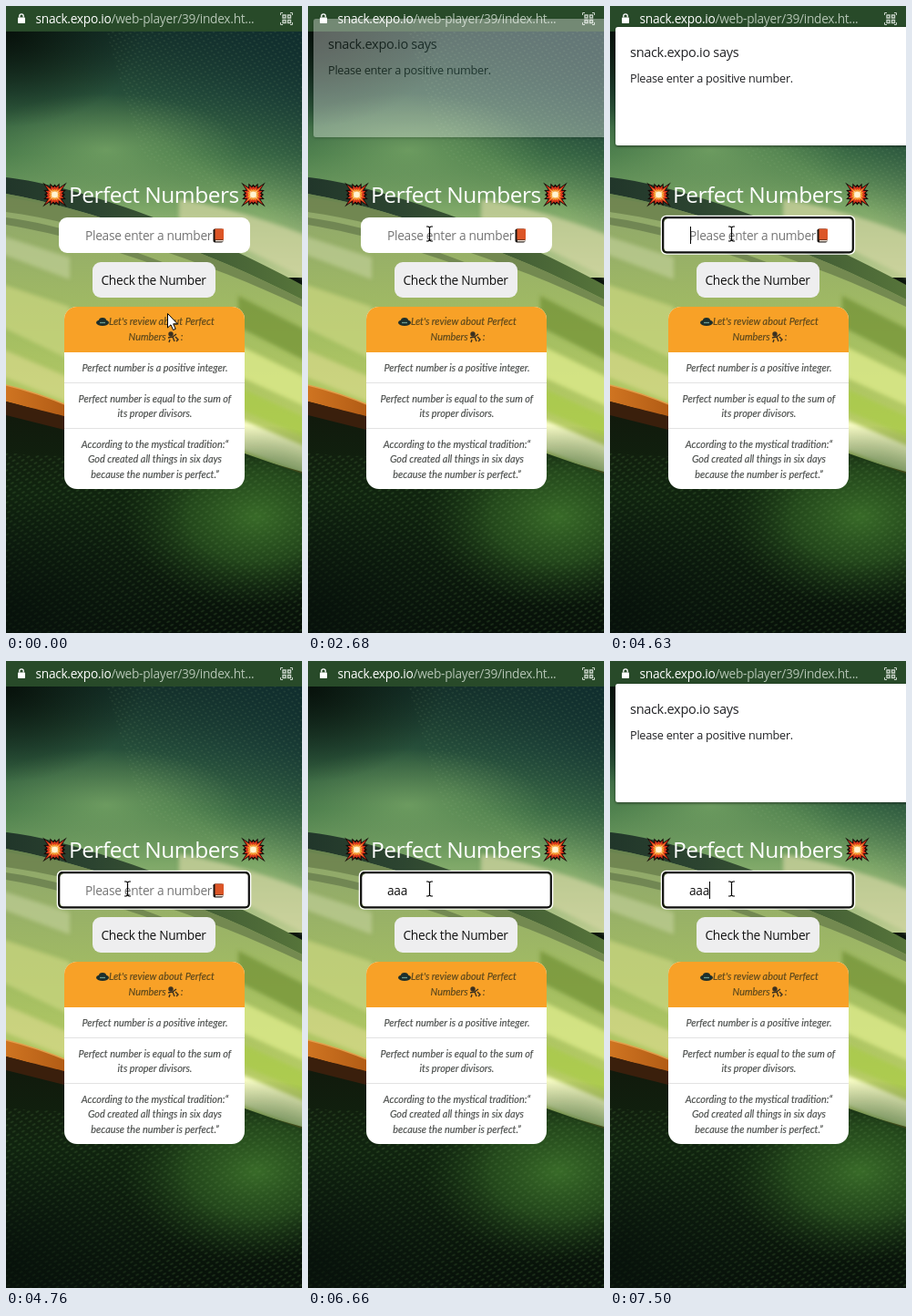
These frames come from a looping animation (325x688 px, 8000 ms). An HTML page:

```html
<!DOCTYPE html>
<html lang="en">
<head>
<meta charset="utf-8">
<title>Perfect Numbers</title>
<style>
  html, body { margin: 0; width: 100%; height: 100%; overflow: hidden; background: #0b150d; }
  svg { display: block; width: 325px; height: 688px; }
  text { font-family: "Open Sans", "Noto Sans", sans-serif; font-size: 13.7px; letter-spacing: -.02em; white-space: pre; }
  .note text { font-family: Lato, sans-serif; font-size: 10.9px; font-style: italic; letter-spacing: 0; text-anchor: middle; fill: #4a4d4b; stroke: #4a4d4b; stroke-width: .15px; }
  .note .head { fill: #59461c; stroke: #59461c; }
</style>
</head>
<body>
<svg viewBox="0 0 325 688">
  <defs>
    <linearGradient id="sky" x1="0" y1="0" x2="0" y2="1">
      <stop offset="0" stop-color="#162f23"/>
      <stop offset=".25" stop-color="#28513a"/>
      <stop offset=".5" stop-color="#467a49"/>
      <stop offset=".72" stop-color="#7da767"/>
      <stop offset="1" stop-color="#bccb90"/>
    </linearGradient>
    <linearGradient id="teal" x1="0" y1="1" x2="1" y2="0">
      <stop offset=".5" stop-color="#14363a" stop-opacity="0"/>
      <stop offset="1" stop-color="#102e2e"/>
    </linearGradient>
    <radialGradient id="glow">
      <stop offset="0" stop-color="#8db873" stop-opacity=".55"/>
      <stop offset="1" stop-color="#7fa36a" stop-opacity="0"/>
    </radialGradient>
    <radialGradient id="shade">
      <stop offset="0" stop-color="#07110b"/>
      <stop offset="1" stop-color="#0c1a11" stop-opacity="0"/>
    </radialGradient>
    <linearGradient id="field" x1="0" y1="0" x2="0" y2="1">
      <stop offset="0" stop-color="#8ea66b"/>
      <stop offset=".5" stop-color="#a5bf62"/>
      <stop offset="1" stop-color="#c3d568"/>
    </linearGradient>
    <linearGradient id="band" x1="0" y1="0" x2="1" y2="0">
      <stop offset="0" stop-color="#21362a"/>
      <stop offset=".3" stop-color="#2c4430"/>
      <stop offset="1" stop-color="#56743a"/>
    </linearGradient>
    <linearGradient id="rust" x1="0" y1="0" x2="1" y2="0">
      <stop offset="0" stop-color="#cf7421"/>
      <stop offset=".3" stop-color="#a4500f"/>
      <stop offset="1" stop-color="#5a3a12"/>
    </linearGradient>
    <linearGradient id="floor" x1="0" y1="0" x2="0" y2="1">
      <stop offset="0" stop-color="#11180c"/>
      <stop offset=".4" stop-color="#10240f"/>
      <stop offset="1" stop-color="#071009"/>
    </linearGradient>
    <radialGradient id="grass">
      <stop offset="0" stop-color="#386a28"/>
      <stop offset=".5" stop-color="#2c5821" stop-opacity=".7"/>
      <stop offset="1" stop-color="#1d3c18" stop-opacity="0"/>
    </radialGradient>
    <pattern id="dots" width="5" height="4.5" patternUnits="userSpaceOnUse" patternTransform="rotate(-24) skewX(14)">
      <circle cx="2" cy="2" r=".9" fill="#9fc38c" opacity=".16"/>
    </pattern>
    <pattern id="weave" width="7" height="5" patternUnits="userSpaceOnUse" patternTransform="rotate(-32) skewX(18)">
      <ellipse cx="3" cy="2.5" rx="2" ry="1" fill="#5c8a48" opacity=".23"/>
    </pattern>
    <filter id="soft"><feGaussianBlur stdDeviation="2.2"/></filter>
    <filter id="drop" x="-10%" y="-20%" width="120%" height="140%">
      <feDropShadow dx="0" dy="1" stdDeviation="1.6" flood-opacity=".55"/>
    </filter>
    <clipPath id="cardClip"><rect x="64" y="330" width="198" height="200" rx="14"/></clipPath>
  </defs>

  <!-- wallpaper: sky, bands falling to the right, dark floor -->
  <rect y="28" width="325" height="270" fill="url(#sky)"/>
  <rect y="28" width="325" height="230" fill="url(#teal)"/>
  <ellipse cx="110" cy="158" rx="150" ry="62" fill="url(#glow)"/>
  <ellipse cx="0" cy="28" rx="150" ry="105" fill="url(#shade)"/>
  <path d="M110 28H325V240L150 165Z" fill="url(#dots)"/>
  <path d="M0 210C100 224 220 262 325 312V520H0Z" fill="url(#field)"/>
  <g filter="url(#soft)">
    <path d="M190 212C240 220 290 236 330 252V300C290 280 240 255 190 235Z" fill="#d3d6a3" opacity=".7"/>
    <path d="M-5 252L70 276V300L-5 272Z" fill="#c2cf9a" opacity=".65"/>
    <path d="M-5 305L70 330V388L-5 352Z" fill="#cbd681" opacity=".7"/>
    <path d="M-5 376L70 408V436L-5 406Z" fill="#dedc92" opacity=".6"/>
    <path d="M255 318L330 356V390L255 352Z" fill="#6f9036" opacity=".7"/>
    <path d="M255 372L330 408V440L255 406Z" fill="#dcea8b" opacity=".8"/>
    <path d="M255 418L330 452V474L255 442Z" fill="#a9cb48" opacity=".7"/>
    <path d="M255 452L330 484V516L255 486Z" fill="#f6fac4"/>
  </g>
  <path d="M0 188C80 197 220 248 325 306V322C220 268 90 222 0 206Z" fill="url(#band)"/>
  <path d="M0 206C90 222 220 268 325 322V330C220 280 90 238 0 226Z" fill="#6a7f4c" opacity=".8"/>
  <path d="M0 232C60 240 130 264 200 292V298C130 270 60 250 0 240Z" fill="#5a6f45" opacity=".6"/>
  <path d="M0 416C25 422 48 430 72 440L325 511V540H0Z" fill="url(#rust)"/>
  <path d="M0 416C25 422 48 430 72 440" fill="none" stroke="#e2a04c" stroke-width="1.400"/>
  <path d="M0 434C60 450 140 474 262 491L325 513V688H0Z" fill="url(#floor)"/>
  <path d="M0 434C40 444 60 449 84 455V470L0 449Z" fill="#3a1f0c"/>
  <ellipse cx="275" cy="560" rx="150" ry="100" fill="url(#grass)"/>
  <path d="M0 490C80 500 210 490 262 493L325 515V688H0Z" fill="url(#weave)"/>
  <ellipse cx="0" cy="660" rx="190" ry="130" fill="url(#shade)" opacity=".75"/>

  <!-- address bar -->
  <rect width="325" height="28" fill="#284a29"/>
  <rect x="13" y="12.500" width="8" height="6.500" rx=".8" fill="#fff"/>
  <path d="M14.800 12.500V11a2.200 2.200 0 0 1 4.400 0v1.500" fill="none" stroke="#fff" stroke-width="1.300"/>
  <text x="32.500" y="19" fill="#fff">snack.expo.io<tspan fill="#b4c4b4">/web-player/39/index.ht...</tspan></text>
  <g fill="none" stroke="#c7d2c7" stroke-width="1.400">
    <path d="M301.500 10V7.500H304M312 7.500H314.500V10M314.500 18V20.500H312M304 20.500H301.500V18" stroke-width="1"/>
    <path d="M304 10h3v3h-3zM309.500 10h3v3h-3zM304 15.500h3v3h-3zM309.500 15.500h3v3h-3z"/>
  </g>

  <!-- heading -->
  <g id="bursts"></g>
  <text x="69" y="216" fill="#fff" style="font-size:24.5px">Perfect Numbers</text>

  <!-- input -->
  <rect x="58" y="232" width="210" height="39" rx="9" fill="#fff"/>
  <g id="ring" fill="none">
    <rect x="56.500" y="230.500" width="212" height="41.500" rx="5" stroke="#fff" stroke-width="1.500"/>
    <rect x="58.200" y="232.200" width="208.600" height="38.100" rx="4" stroke="#101010" stroke-width="2.200"/>
  </g>
  <g id="hint">
    <text x="87" y="257" fill="#757575">Please enter a number</text>
    <rect x="227.500" y="244.500" width="11" height="15" rx="1.800" fill="#1c1410"/>
    <rect x="229.500" y="244.500" width="9.500" height="12" fill="#dc5526"/>
    <path d="M230 257.700h8.500" stroke="#eee3d8" stroke-width="1.400"/>
  </g>
  <text id="typed" x="87" y="257" fill="#111"></text>
  <rect id="caret" y="242" width="1" height="19" fill="#000"/>

  <!-- button -->
  <rect x="95" y="281" width="135" height="39" rx="9" fill="#eeeeef"/>
  <text x="104.500" y="306" fill="#111">Check the Number</text>

  <!-- card -->
  <g class="note">
    <g clip-path="url(#cardClip)">
      <rect x="64" y="330" width="198" height="200" fill="#fff"/>
      <rect x="64" y="330" width="198" height="50" fill="#f8a127"/>
      <path d="M64 413.500H262M64 463.500H262" stroke="#e2e2e2"/>
    </g>
    <text class="head" x="171" y="350">Let's review about Perfect</text>
    <text class="head" x="155" y="367">Numbers</text>
    <text class="head" x="193" y="367">:</text>
    <g fill="#1d2f2c">
      <ellipse cx="106" cy="347.500" rx="7" ry="3.400"/>
      <ellipse cx="106" cy="345" rx="4" ry="3"/>
      <path d="M103 347.500h6" stroke="#6d9a8f" stroke-width="1.300"/>
    </g>
    <g fill="none" stroke="#3a3020" stroke-width="1.400">
      <circle cx="181" cy="360" r="2" fill="#3a3020"/>
      <path d="M178 364l5-1 2 5M183 363l4-3M180 366l-1 3M186 363l3 3-2 2"/>
    </g>
    <text x="163.500" y="401">Perfect number is a positive integer.</text>
    <text x="163.500" y="435">Perfect number is equal to the sum of</text>
    <text x="163.500" y="451">its proper divisors.</text>
    <text x="163.500" y="485">According to the mystical tradition:“</text>
    <text x="163.500" y="501">God created all things in six days</text>
    <text x="163.500" y="518">because the number is perfect.”</text>
  </g>

  <!-- alert -->
  <g id="alert">
    <rect x="6" y="25" width="340" height="130" rx="3" fill="#fff" filter="url(#drop)"/>
    <text x="22" y="58" fill="#202124" style="font-size:14.5px">snack.expo.io says</text>
    <text x="22" y="86" fill="#202124" style="font-size:12.7px">Please enter a positive number.</text>
  </g>

  <!-- pointers -->
  <path id="arrow" d="M.5.5V16L4 12.800 6.600 18.500 9.200 17.300 6.700 11.800H11.300Z" fill="#fff" stroke="#000" stroke-width="1"/>
  <path id="beam" d="M-3-8H-1L.5-7 2-8H4M.5-7V7M-3 8H-1L.5 7 2 8H4" fill="none" stroke="#000" stroke-width="1.200"/>
</svg>
<script>
  const $ = id => document.getElementById(id);
  const LOOP = 8000;

  // Each row: start time, then the values held until the next row.
  const pointer = [
    [0, 'arrow', 177, 337], [70, 'arrow', 175, 333], [140, 'arrow', 170, 323],
    [210, 'arrow', 163, 309], [280, 'arrow', 156, 295], [350, 'arrow', 149, 280],
    [420, 'beam', 142, 262], [490, 'beam', 133, 244], [560, 'beam', 138, 246],
    [950, 'beam', 136, 248], [1030, 'beam', 133, 250]
  ];
  const caret = [
    [0, 0], [1030, 1], [1510, 0], [2050, 1], [2520, 0], [4630, 1], [4760, 0],
    [5160, 1], [5710, 0], [5800, 1], [6660, 0], [7120, 1]
  ];
  const typed = [[0, 0], [5800, 1], [5950, 2], [6100, 3]];
  const focus = [[0, 0], [4630, 1]];
  const alertBox = [
    [0, 0, 0], [2680, -11, .35], [2750, -4, .8], [2830, 0, 1],
    [4630, -2, 1], [4680, -9, .45], [4760, 0, 0],
    [7290, -13, .15], [7360, -8, .5], [7430, -3, .85], [7500, 0, 1]
  ];

  const at = (rows, t) => rows.findLast(row => row[0] <= t).slice(1);
  const show = (id, on) => $(id).setAttribute('visibility', on ? 'visible' : 'hidden');
  const move = (id, x, y) => $(id).setAttribute('transform', `translate(${x} ${y})`);

  function burst(cx, cy) {
    const layers = [[1, '#160b08'], [.8, '#d9361c'], [.55, '#f59a2e'], [.33, '#fff3d0']];
    return layers.map(([size, fill]) => {
      const points = Array.from({ length: 32 }, (_, i) => {
        const a = i * Math.PI / 16;
        const r = size * (i % 2 ? 9.5 : 11.5 + 7.5 * Math.sin(2 * a) ** 4);
        return `${(cx + r * Math.cos(a)).toFixed(1)},${(cy + r * Math.sin(a)).toFixed(1)}`;
      });
      return `<polygon points="${points.join(' ')}" fill="${fill}"/>`;
    }).join('');
  }

  function draw(t) {
    const [kind, x, y] = at(pointer, t);
    move(kind, x, y);
    show('arrow', kind === 'arrow');
    show('beam', kind === 'beam');

    const [count] = at(typed, t);
    $('typed').textContent = 'a'.repeat(count);
    show('hint', !count);
    $('caret').setAttribute('x', 88 + 7 * count);
    show('caret', at(caret, t)[0]);
    show('ring', at(focus, t)[0]);

    const [shift, alpha] = at(alertBox, t);
    move('alert', 0, shift);
    $('alert').setAttribute('opacity', alpha);
  }

  $('bursts').innerHTML = burst(53.5, 207) + burst(271.5, 207);
  const start = performance.now();
  function tick() {
    draw((performance.now() - start) % LOOP);
    requestAnimationFrame(tick);
  }
  tick();
</script>
</body>
</html>
```
